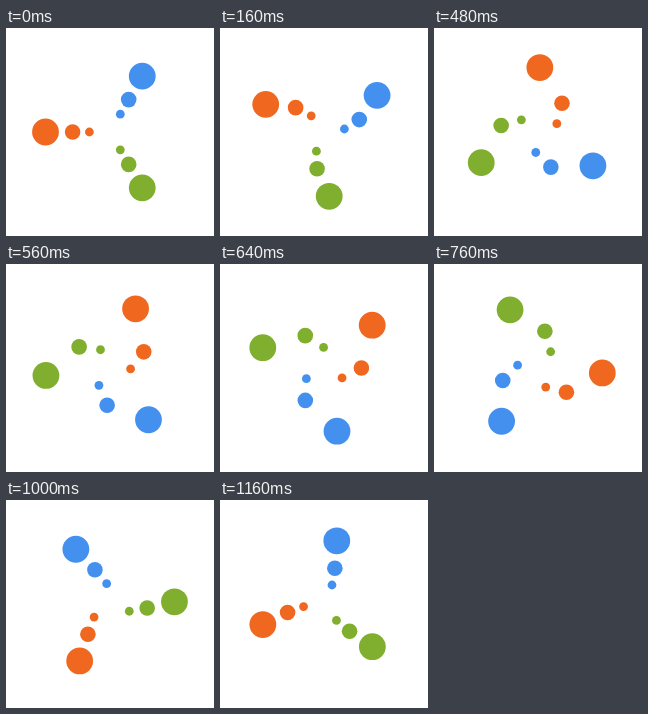
An HTML page that plays this animation: 208x208 px, repeating every 1200 ms.

```html
<!DOCTYPE html>
<html lang="en">
<head>
<meta charset="utf-8">
<title>Spinner</title>
<style>
  html, body { margin: 0; width: 100%; height: 100%; overflow: hidden; background: #fff; }
  svg { display: block; width: 100vw; height: 100vh; }
</style>
</head>
<body>
<svg viewBox="0 0 208 208"></svg>
<script>
// The loop restarts shortly before the full turn is complete.
const LOOP = 1200, TURN = 1300, STEP = 40;
const rings = [
  { orbit: 64.5, r: 13.4, ease: bezier(.78, .415, .59, .86) },
  { orbit: 37.4, r: 7.8, ease: bezier(.75, .67, .73, .96) },
  { orbit: 20.6, r: 4.4, ease: bezier(.75, .87, .8, 1) }
];
const colors = ['#f06820', '#4490ee', '#80ae2e'];

// Same easing as CSS cubic-bezier(), solved by bisection.
function bezier(x1, y1, x2, y2) {
  const at = (a, b, s) => 3 * (1 - s) * s * ((1 - s) * a + s * b) + s ** 3;
  return x => {
    let low = 0, high = 1;
    for (let i = 0; i < 24; i++) {
      const mid = (low + high) / 2;
      if (at(x1, x2, mid) < x) low = mid; else high = mid;
    }
    return at(y1, y2, low);
  };
}

const svg = document.querySelector('svg');
const dots = rings.flatMap(ring => colors.map((fill, arm) => {
  const el = document.createElementNS(svg.namespaceURI, 'circle');
  el.setAttribute('r', ring.r);
  el.setAttribute('fill', fill);
  svg.append(el);
  return { el, arm, ...ring };
}));

function draw() {
  const t = Math.floor(performance.now() % LOOP / STEP) * STEP;
  for (const { el, arm, orbit, ease } of dots) {
    const angle = 2 * Math.PI * (ease(t / TURN) + 1 / 2 + arm / 3);
    el.setAttribute('cx', 104 + orbit * Math.cos(angle));
    el.setAttribute('cy', 104 + orbit * Math.sin(angle));
  }
  requestAnimationFrame(draw);
}
draw();
</script>
</body>
</html>
```
